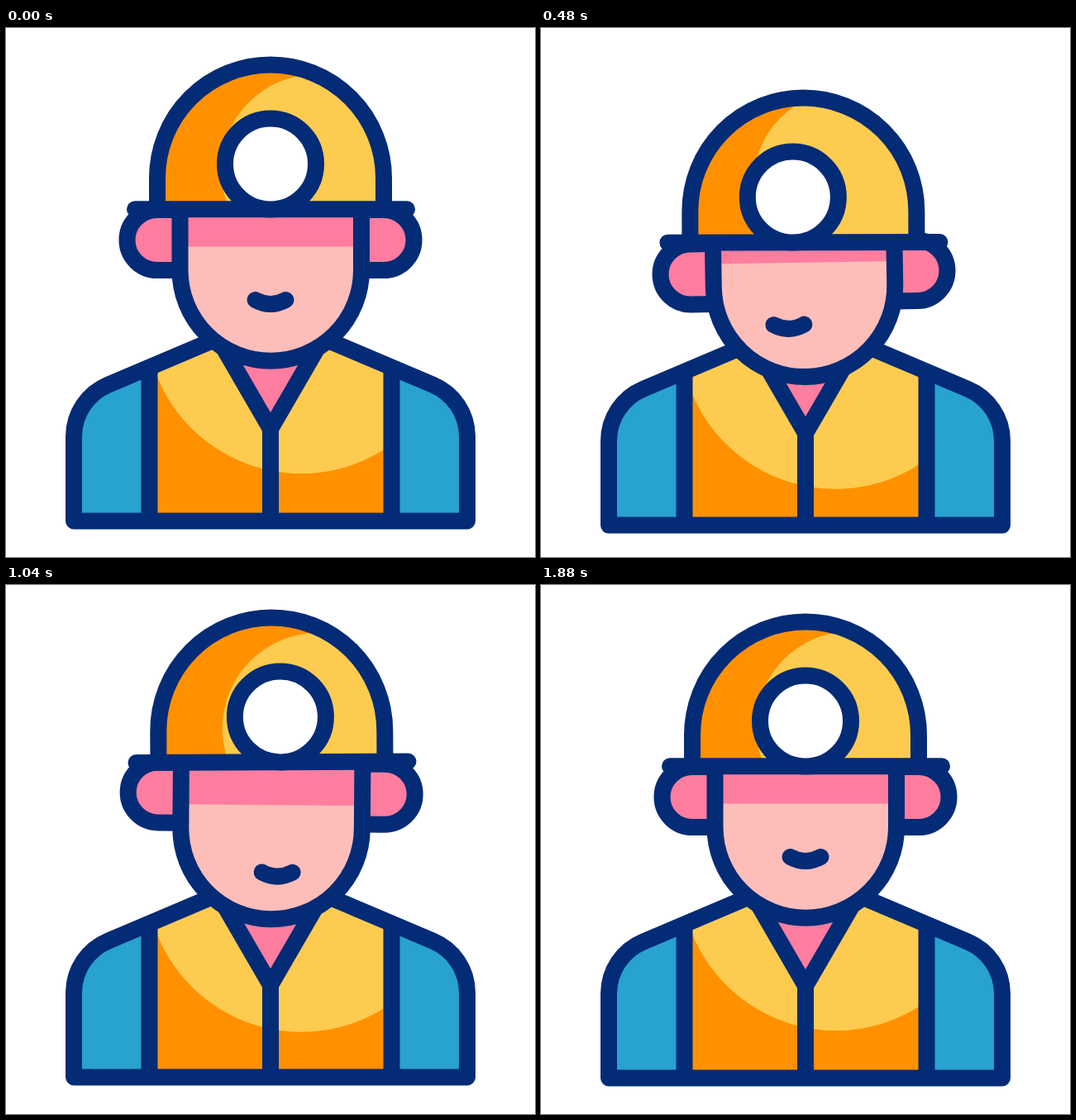
These frames come from a looping animation (640 by 640 pixels, 2240 ms). An HTML page with a canvas:

```html
<!DOCTYPE html>
<html lang="en">
<head>
<meta charset="utf-8">
<title>Miner</title>
<style>
html, body { margin: 0; width: 100%; height: 100%; overflow: hidden; background: #fff; }
canvas { display: block; width: 640px; height: 640px; }
</style>
</head>
<body>
<canvas id="stage" width="640" height="640"></canvas>
<script>
const ctx = document.getElementById('stage').getContext('2d');
const LOOP = 2240, STEP = 40;
const NAVY = '#042b76', BLUE = '#28a2ce', ORANGE = '#ff9100', YELLOW = '#fdcb50',
      PINK = '#ff7d9f', SKIN = '#fdbeb9';

// Eases in and out from each [time, value] pose to the next.
const moves = (...poses) => t => {
  const next = poses.findIndex(p => p[0] > t);
  if (next < 0) return poses[poses.length - 1][1];
  if (next === 0) return poses[0][1];
  const [t0, v0] = poses[next - 1], [t1, v1] = poses[next];
  const u = (t - t0) / (t1 - t0);
  return v0 + (v1 - v0) * u * u * (3 - 2 * u);
};

// Two nods: the body leads, the head follows.
const bodyY = moves([0, 0], [240, 25], [680, -10], [940, -10], [1180, 14], [1500, 0]);
const headY = moves([0, 0], [280, 34], [720, 0], [1000, 0], [1240, 21], [1640, 0]);
const headTurn = moves([0, 0], [280, -1.35], [980, 0.8], [1240, -1.8], [1720, 0]);
// Looking around: the hat, lamp and mouth slide over the head.
const hatY = moves([200, 0], [600, 25.5], [840, -20], [1240, 8], [1440, 12], [1880, 0]);
const lampX = moves([220, 0], [740, -25], [1240, 30], [1780, 0]);
const mouthX = moves([100, 0], [700, -27.5], [1240, 23.5], [1800, 0]);
const mouthY = moves([0, 0], [840, 17], [1040, 17], [1800, 0]);

function spin(x, y, deg) {
  ctx.translate(x, y);
  ctx.rotate(deg * Math.PI / 180);
  ctx.translate(-x, -y);
}

// Adds the mirror image of a path drawn for the left side.
function bothSides(d) {
  const half = new Path2D(d), both = new Path2D(half);
  both.addPath(half, new DOMMatrix([-1, 0, 0, 1, 640, 0]));
  return both;
}

function disc(x, y, r) {
  const p = new Path2D();
  p.arc(x, y, r, 0, 2 * Math.PI);
  return p;
}

function fill(path, color) {
  ctx.fillStyle = color;
  ctx.fill(path);
}

const coat = bothSides('M262 373 L124 431.5 A68 68 0 0 0 82 494 V596.5 H320');
const vest = bothSides('M173.5 410.5 L262 373 L320 485 V596.5 H173.5 Z');
const neck = new Path2D('M254 371 L320 485 L386 371 Z');
const seams = bothSides('M262 385 L320 485 V590 M173.5 414 V590');
const face = new Path2D('M210.5 188 V293 A109.75 109.75 0 0 0 430 293 V188');
const ears = bothSides('M212 293 H183 A36.5 36.5 0 0 1 183 220 H212');
const dome = new Path2D('M183 219 V181.5 A137 137 0 0 1 457 181.5 V219');
const brim = new Path2D('M156 219.3 H485');
const mouth = new Path2D('M301.5 329 Q320 339 338.5 329');
const vestLight = disc(357, 351, 188);
const hatLight = disc(375.5, 171.5, 115.5);

function toHead(t) {
  ctx.setTransform(1, 0, 0, 1, 0, headY(t));
  spin(320, 400, headTurn(t));
}

// The light patches follow the head while staying inside their own garment.
function patch(clip, t, light) {
  ctx.save();
  ctx.clip(clip);
  toHead(t);
  fill(light, YELLOW);
  ctx.restore();
}

function drawBody(t) {
  ctx.setTransform(1, 0, 0, 1, 0, bodyY(t));
  fill(coat, BLUE);
  fill(vest, ORANGE);
  patch(vest, t, vestLight);
  fill(neck, PINK);
  ctx.stroke(coat);
  ctx.stroke(seams);
}

function drawHead(t) {
  toHead(t);
  ctx.translate(0, hatY(t));
  fill(ears, PINK);
  ctx.stroke(ears);

  toHead(t);
  fill(face, SKIN);
  ctx.fillStyle = PINK;
  ctx.fillRect(210.5, 188, 219.5, 76.5);
  ctx.stroke(face);

  ctx.translate(mouthX(t), mouthY(t));
  ctx.stroke(mouth);
}

function drawHat(t) {
  toHead(t);
  ctx.translate(0, hatY(t));
  spin(270, 219, -0.065 * lampX(t));
  fill(dome, ORANGE);
  patch(dome, t, hatLight);
  ctx.stroke(dome);
  ctx.stroke(brim);

  const lamp = disc(320 + lampX(t), 164.5, 55);
  fill(lamp, '#fff');
  ctx.stroke(lamp);
}

function draw(t) {
  ctx.setTransform(1, 0, 0, 1, 0, 0);
  ctx.fillStyle = '#fff';
  ctx.fillRect(0, 0, 640, 640);
  ctx.strokeStyle = NAVY;
  ctx.lineWidth = 20;
  ctx.lineCap = ctx.lineJoin = 'round';
  drawBody(t);
  drawHead(t);
  drawHat(t);
}

const start = performance.now();
function tick() {
  const t = (performance.now() - start) % LOOP;
  draw(Math.floor(t / STEP) * STEP);
  requestAnimationFrame(tick);
}
tick();
</script>
</body>
</html>
```
